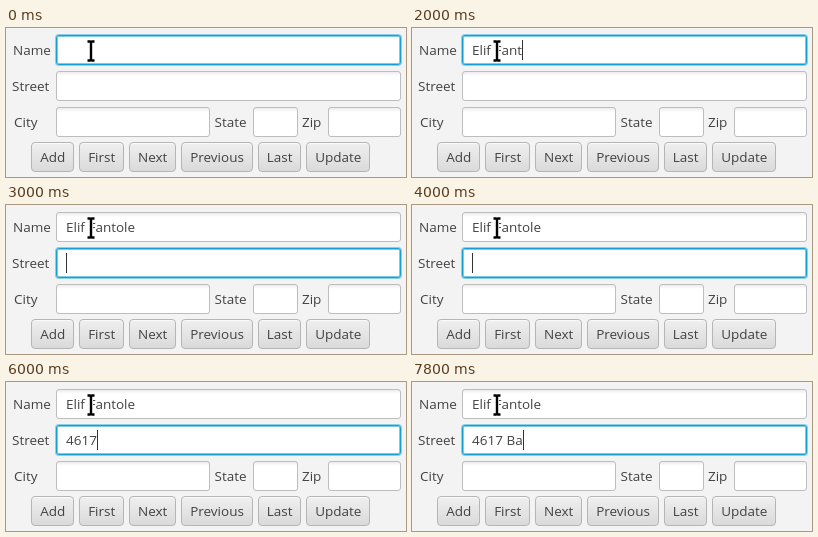
An HTML page for the animation above (8000 ms loop, 400x149 px).

```html
<!DOCTYPE html>
<html lang="en">
<head>
<meta charset="utf-8">
<title>Address form</title>
<style>
  html, body { margin: 0; width: 100%; height: 100%; overflow: hidden; background: #f3f3f3; }
  #form {
    position: relative; width: 400px; height: 149px; overflow: hidden;
    font: 13.5px/20px "Open Sans", "Noto Sans", sans-serif; color: #424242; white-space: pre;
  }
  #form > * { position: absolute; box-sizing: border-box; }
  .field {
    height: 30px; padding: 4px 0 0 9px; border: 1px solid #bdbdbd; border-radius: 3px;
    background: linear-gradient(#ececec, #fff 4px);
  }
  .field.focused {
    border-color: #149fd2; background: #fff;
    box-shadow: inset 0 0 0 1px #7accE8, 0 0 0 1px #8dcfe6;
  }
  .caret { display: inline-block; width: 1px; height: 20px; margin-right: -1px; vertical-align: top; background: #333; }
  .buttons { left: 25.4px; top: 114px; display: flex; gap: 5px; }
  .buttons span {
    padding: 4px 7.9px; border: 1px solid #b5b5b5; border-radius: 4px;
    background: linear-gradient(#efefef, #dadada); box-shadow: inset 0 1px #fafafa;
  }
  #pointer { left: 79px; top: 11px; fill: none; }
</style>
</head>
<body>
<div id="form">
  <div class="buttons"></div>
</div>
<script>
const LOOP = 8000, TICK = 200, BLINK = 500, ROW_HEIGHT = 36;
const form = document.getElementById('form');

function add(parent, tag, className = '', text = '', style = {}) {
  const el = document.createElement(tag);
  el.className = className;
  el.textContent = text;
  Object.assign(el.style, style);
  parent.append(el);
  return el;
}

function addInput(label, labelX, row, x, right) {
  const top = 7 + row * ROW_HEIGHT;
  add(form, 'label', '', label, { left: labelX + 'px', top: top + 5 + 'px' });
  const box = add(form, 'div', 'field', '', { left: x + 'px', top: top + 'px', width: right - x + 'px' });
  return { box, text: add(box, 'span'), caret: add(box, 'span', 'caret') };
}

const inputs = [
  addInput('Name', 7, 0, 50, 395),
  addInput('Street', 6, 1, 50, 395),
  addInput('City', 8, 2, 50, 204),
  addInput('State', 208.5, 2, 247, 292),
  addInput('Zip', 296, 2, 322, 395)
];

for (const name of ['Add', 'First', 'Next', 'Previous', 'Last', 'Update']) {
  add(form.querySelector('.buttons'), 'span', '', name);
}

const beam = 'M2.5 2.5H5L6 3.5 7 2.5H9.5M6 3V21M2.5 21.5H5L6 20.5 7 21.5H9.5';
form.insertAdjacentHTML('beforeend', `
  <svg id="pointer" width="13" height="24">
    <path d="${beam}" stroke="#fff" stroke-width="4"/>
    <path d="${beam}" stroke="#000" stroke-width="2.4"/>
  </svg>`);

// A burst with no text only moves the focus.
const bursts = [
  { input: 0, text: '', start: 100 },
  { input: 0, text: 'Elif Fantole', start: 490, pace: 180 },
  { input: 1, text: '', start: 2900 },
  { input: 1, text: '4617', start: 5400, pace: 200 },
  { input: 1, text: ' ', start: 6700 },
  { input: 1, text: 'Ba', start: 7600, pace: 200 }
];
const strokes = bursts.flatMap(({ input, text, start, pace = 0 }) =>
  (text ? [...text] : ['']).map((char, i) => ({ input, char, time: start + i * pace })));

function render(time) {
  const now = Math.floor(time % LOOP / TICK) * TICK;
  const past = strokes.filter(stroke => stroke.time <= now);
  const last = past.at(-1);
  const focus = last ? last.input : 0;
  const caretOn = last && (now - last.time) % (2 * BLINK) < BLINK;

  inputs.forEach(({ box, text, caret }, i) => {
    const value = past.filter(stroke => stroke.input === i).map(stroke => stroke.char).join('');
    if (text.textContent !== value) text.textContent = value;
    box.classList.toggle('focused', i === focus);
    caret.style.visibility = i === focus && caretOn ? 'visible' : 'hidden';
  });
}

const begin = performance.now();
function tick(now) {
  render(Math.max(0, now - begin));
  requestAnimationFrame(tick);
}
render(0);
requestAnimationFrame(tick);
</script>
</body>
</html>
```
